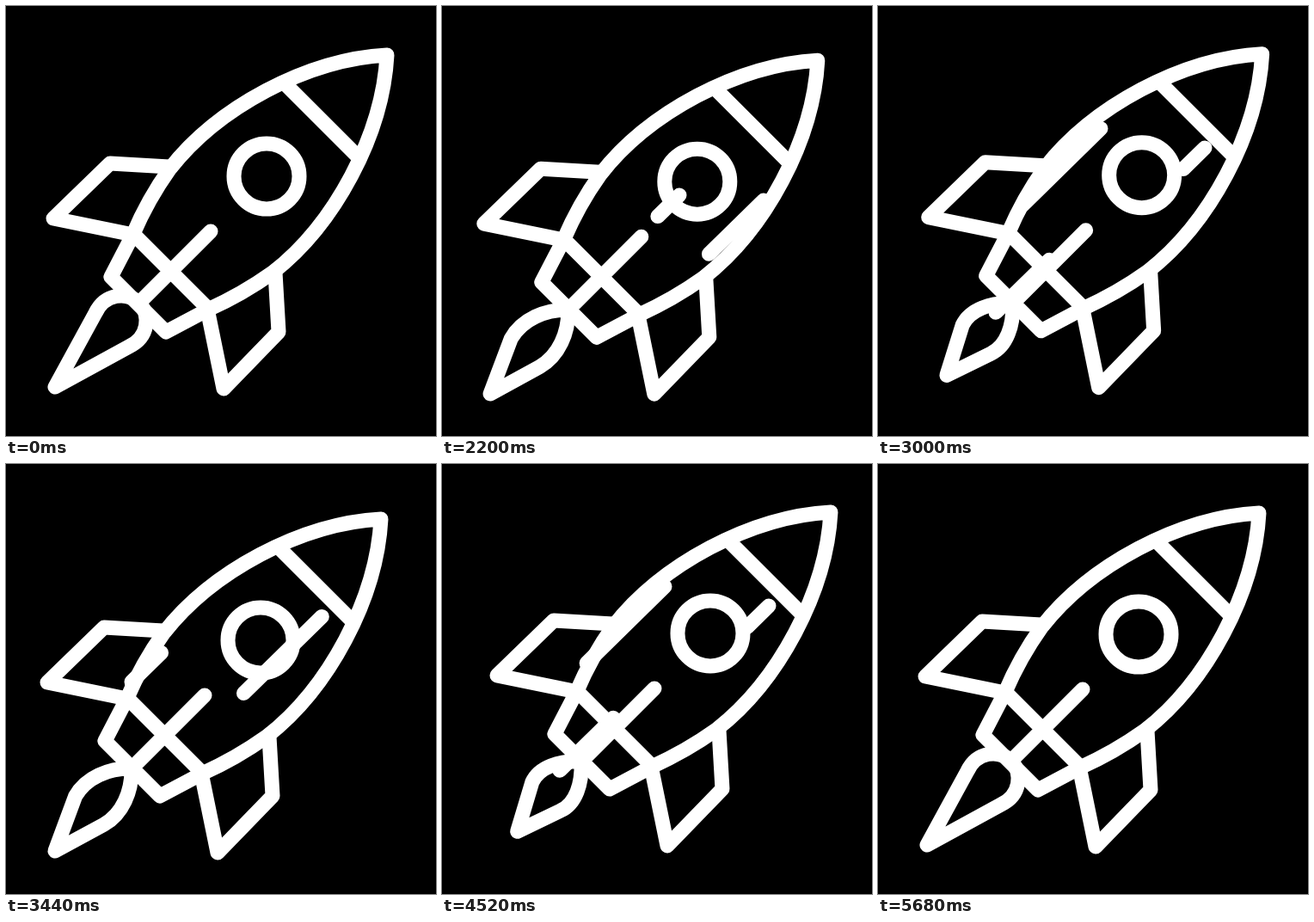
Animation, 500 px wide and 500 px high, one loop 6 s. Source, as an HTML page:

```html
<!DOCTYPE html>
<html>
<head>
<meta charset="utf-8">
<style>
  html, body { margin: 0; width: 100%; height: 100%; overflow: hidden; background: #000; }
  svg { display: block; width: 100%; height: 100%; fill: none; stroke: #fff; stroke-width: 17; stroke-linecap: round; stroke-linejoin: round; }
</style>
</head>
<body>
<svg viewBox="0 0 500 500">
  <g id="rocket">
    <path d="M443 57C350 62 246 118 190 190Q165 225 148 265L122 315L186 379L235 353Q275 335 310 310C382 254 438 150 443 57Z"/>
    <path d="M325 91L409 175M148 265L235 352M238 262L160 340"/>
    <path d="M190 187L121 183L55 247L148 266M313 310L317 379L253 445L234 352"/>
    <circle cx="303" cy="198" r="38"/>
    <path id="flame"/>
  </g>
  <path id="streaks"/>
</svg>
<script>
const LOOP = 6000, TRIM = 780, LAG = 510, REPEAT = 1520;
const [rocket, flame, streaks] = ['rocket', 'flame', 'streaks'].map(id => document.getElementById(id));

const clamp = v => Math.min(1, Math.max(0, v));
const mix = (a, b, u) => a + (b - a) * u;
const mirror = ([x, y]) => [500 - y, 500 - x];
const cycle = (t, peak, period) => Math.cos(2 * Math.PI * (t - peak) / period);

function ramp(t, from, to) {
  const u = clamp((t - from) / (to - from));
  return u * u * (3 - 2 * u);
}

// -1 pulled back, 0 at rest, 1 hovering forward
const thrustAt = t => 2 * (ramp(t, 2150, 2500) - ramp(t, 2780, 3380) + ramp(t, 3460, 3800))
  - ramp(t, 1680, 1950) - ramp(t, 4600, 5300);

function moveRocket(t, thrust) {
  const shake = cycle(t, 4695, 611);
  const [x, y] = thrust < 0 ? [7, -7] : [9.3 + 1.5 * shake, -2.5 - 6.5 * shake];
  rocket.setAttribute('transform', `translate(${x * thrust} ${y * thrust})`);
}

// One half of the flame outline, from tip to head; the other half is mirrored
const calm = [[57, 443], [104, 357], [115, 334], [140, 332], [155, 345]];
const leaf = [[79, 428], [96, 371], [104, 353], [128, 346], [151, 347]];

function drawFlame(t, thrust) {
  const burn = ramp(t, 1700, 1950) - ramp(t, 4750, 5250);
  const stretch = mix(.5 - .5 * cycle(t, 3895, 308), .5, clamp(-thrust));
  const half = leaf.map(([x, y], i) => {
    const pull = 30 * stretch * (1 - i / 4) ** 2;
    return [mix(calm[i][0], x - pull, burn), mix(calm[i][1], y + pull, burn)];
  });
  const [tip, side, c1, c2, head] = half;
  const [, mSide, m1, m2, mHead] = half.map(mirror);
  flame.setAttribute('d', `M${tip}L${side}C${c1} ${c2} ${head}L${mHead}C${m2} ${m1} ${mSide}Z`);
}

const lines = [
  { x: 374, y: 226, length: 98, start: 1695, passes: 1 },
  { x: 276, y: 220, length: 139, start: 2060, passes: 2 },
  { x: 285, y: 117, length: 139, start: 2345, passes: 2 },
  { x: 380, y: 165, length: 139, start: 2860, passes: 2 }
];

function drawStreaks(t) {
  let d = '';
  for (const { x, y, length, start, passes } of lines) {
    const at = u => `${x - length * u} ${y + .98 * length * u}`;
    for (let i = 0; i < passes; i++) {
      const age = t - start - i * REPEAT;
      const front = clamp(age / TRIM), back = clamp((age - LAG) / TRIM);
      if (front > back) d += `M${at(back)}L${at(front)}`;
    }
  }
  streaks.setAttribute('d', d);
}

const begin = performance.now();
function frame() {
  const t = (performance.now() - begin) % LOOP;
  const thrust = thrustAt(t);
  moveRocket(t, thrust);
  drawFlame(t, thrust);
  drawStreaks(t);
  requestAnimationFrame(frame);
}
frame();
</script>
</body>
</html>
```
